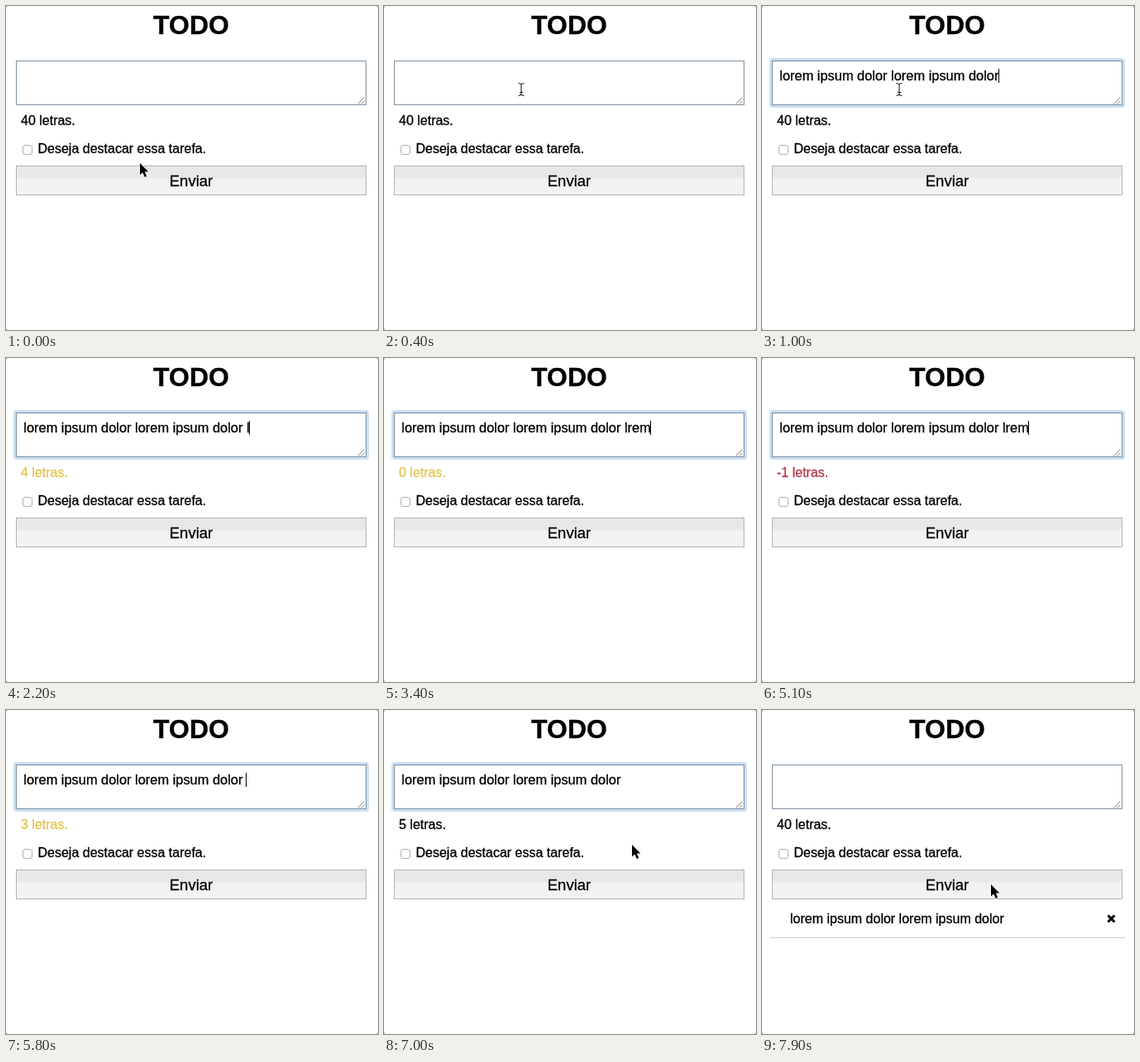
Recreate the animation shown at these times as an HTML page. Size 450x392 px, loop 8 s.

```html
<!DOCTYPE html>
<html lang="pt">
<head>
<meta charset="utf-8">
<title>Todo</title>
<style>
  html, body { margin: 0; width: 100%; height: 100%; overflow: hidden; background: #aaa; }
  svg { display: block; width: 450px; height: 392px; }
  text {
    font: 16px "Liberation Sans", Arial, sans-serif; white-space: pre;
    fill: currentColor; stroke: currentColor; stroke-width: .3px;
  }
  #title { font-size: 32px; font-weight: bold; }
  #typed { font-size: 16.4px; }
  #send { font-size: 18.5px; }
</style>
</head>
<body>
<svg viewBox="0 0 450 392">
  <defs>
    <linearGradient id="face" x2="0" y2="1">
      <stop offset="0" stop-color="#e7e7e7"/>
      <stop offset=".38" stop-color="#e8e8e8"/>
      <stop offset=".45" stop-color="#f2f2f2"/>
      <stop offset="1" stop-color="#f3f3f3"/>
    </linearGradient>
  </defs>
  <rect width="450" height="392" rx="3" fill="#fff"/>
  <text id="title" x="224" y="34" text-anchor="middle">TODO</text>

  <rect id="ring" x="10.5" y="64.5" width="427" height="57" rx="2" fill="none" stroke="#cbdef3" stroke-width="3"/>
  <rect x="12.5" y="66.5" width="423" height="53" fill="#fff" stroke="#8090a2"/>
  <path d="M425.5 118.5l8-8M429.5 118.5l4-4" stroke="#888"/>
  <text id="typed" x="21.3" y="90" xml:space="preserve"></text>
  <rect id="caret" y="76" width="1" height="17"/>

  <text id="counter" x="18" y="144"></text>
  <rect x="20.5" y="168.5" width="11" height="11" rx="2.5" fill="#fff" stroke="#b0b0b0"/>
  <text x="38.5" y="178">Deseja destacar essa tarefa.</text>
  <rect x="12.5" y="193.5" width="423" height="35" fill="url(#face)" stroke="#b3b3b3"/>
  <text id="send" x="224" y="218" text-anchor="middle">Enviar</text>

  <g id="item">
    <text x="34" y="258">lorem ipsum dolor lorem ipsum dolor</text>
    <path d="M418.5 248.5l8 8m0-8l-8 8" stroke="#000" stroke-width="3"/>
    <path d="M10 275.5h429" stroke="#ccc"/>
  </g>

  <path id="arrow" d="M0 0V14.5L3.3 11.4 5.8 17 8.2 16 5.8 10.5H10.3Z" stroke="#fff" stroke-width="1.2" paint-order="stroke"/>
  <path id="beam" d="M-3.5-7.5Q0-7.5 0-5V5Q0 7.5-3.5 7.5M3.5-7.5Q0-7.5 0-5V5Q0 7.5 3.5 7.5M-2 3.5H2" fill="none" stroke="#222" stroke-width="1.1"/>
</svg>
<script>
const LOOP = 8000, STEP = 100, BLINK = 500, LIMIT = 40;
const FOCUS = 600, PASTE = 1000, BLUR = 7700, SUBMIT = 7800;
const HIDE_POINTER = 1800, WAKE_POINTER = 7000;
const PHRASE = "lorem ipsum dolor lorem ipsum dolor", TAIL = " lrem ips";

// Each burst of keys adds (+1) or deletes (-1) one character per press.
const bursts = [
  { at: 1800, gap: 400, presses: 2, change: 1 },
  { at: 2400, gap: 200, presses: 2, change: 1 },
  { at: 3300, gap: 300, presses: 1, change: 1 },
  { at: 3600, gap: 60, presses: 4, change: 1 },
  { at: 4600, gap: 165, presses: 8, change: -1 },
  { at: 6200, gap: 0, presses: 1, change: -1 }
];
const keys = bursts.flatMap(({ at, gap, presses, change }) =>
  Array.from({ length: presses }, (_, i) => ({ time: at + i * gap, change })));

const moves = [
  { at: 0, x: 166, y: 101 },
  { at: 1200, x: 300, y: 163 },
  { at: WAKE_POINTER, x: 277, y: 211 }
];
const MOVE_TIME = 400;

const BLACK = [0, 0, 0], YELLOW = [226, 196, 77], RED = [176, 56, 72];

const $ = id => document.getElementById(id);
const show = (id, visible) => $(id).setAttribute("visibility", visible ? "visible" : "hidden");

function typedAt(t) {
  if (t < PASTE || t >= SUBMIT) return "";
  const extra = keys.reduce((sum, key) => sum + (key.time <= t ? key.change : 0), 0);
  return PHRASE + TAIL.slice(0, extra);
}

// The counter follows the field one step late.
const lettersLeft = t => LIMIT - typedAt(t - STEP).length;

function warning(t) {
  const left = lettersLeft(t);
  return left < 0 ? RED : left < 5 ? YELLOW : BLACK;
}

// Averaging the recent colours gives a short linear fade.
function counterColor(t) {
  const recent = [0, 1, 2].map(i => warning(t - i * STEP));
  return `rgb(${BLACK.map((_, c) => Math.round(recent.reduce((sum, rgb) => sum + rgb[c], 0) / 3))})`;
}

function pointerAt(t) {
  let x = 162, y = 190;
  for (const move of moves) {
    const p = Math.min(1, Math.max(0, (t - move.at) / MOVE_TIME));
    x += (move.x - x) * p;
    y += (move.y - y) * p;
  }
  return [x, y];
}

function caretOn(t) {
  const start = [FOCUS, PASTE, ...keys.map(key => key.time)].findLast(time => time <= t);
  return Math.floor((t - start) / BLINK) % 2 === 0;
}

function draw(t) {
  const focused = t >= FOCUS && t < BLUR;
  $("typed").textContent = typedAt(t);
  $("caret").setAttribute("x", Math.floor(21 + $("typed").getComputedTextLength()));
  show("caret", focused && caretOn(t));
  show("ring", focused);

  $("counter").textContent = lettersLeft(t) + " letras.";
  $("counter").style.color = counterColor(t);
  show("item", t >= SUBMIT);

  const [x, y] = pointerAt(t);
  const awake = t < HIDE_POINTER || t >= WAKE_POINTER, overField = y < 120;
  for (const id of ["arrow", "beam"]) $(id).setAttribute("transform", `translate(${x} ${y})`);
  show("arrow", awake && !overField);
  show("beam", awake && overField);
}

const begin = performance.now();
function tick() {
  const t = (performance.now() - begin) % LOOP;
  draw(Math.floor(t / STEP) * STEP);
  requestAnimationFrame(tick);
}
tick();
</script>
</body>
</html>
```
